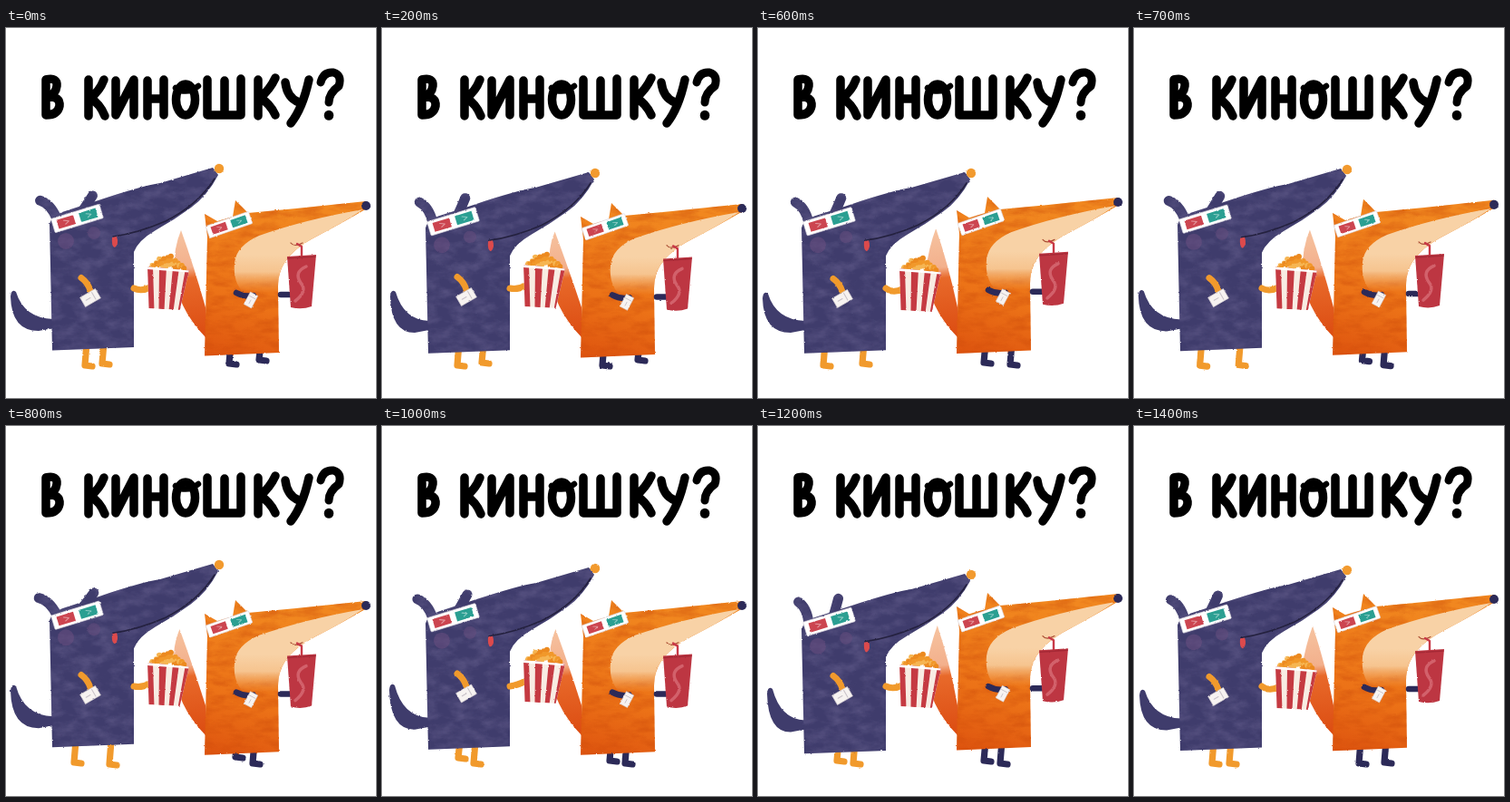
Animation, 408 px wide and 408 px high, one loop 1500 ms. Source, as an HTML page:

```html
<!DOCTYPE html>
<html lang="ru">
<head>
<meta charset="utf-8">
<style>
html, body { margin: 0; width: 100%; height: 100%; overflow: hidden; background: #fff; }
svg { display: block; width: 100vw; height: 100vh; }
path { stroke-linecap: round; stroke-linejoin: round; }
.line { fill: none; }
.orange { stroke: #f19a2c; }
.navy { stroke: #2c2a58; }
</style>
</head>
<body>
<svg viewBox="0 0 408 408">
  <defs>
    <filter id="rough" filterUnits="userSpaceOnUse" x="0" y="0" width="408" height="408" color-interpolation-filters="sRGB">
      <feTurbulence type="fractalNoise" baseFrequency=".35" numOctaves="2" seed="4"/>
      <feDisplacementMap in="SourceGraphic" scale="2" xChannelSelector="R" yChannelSelector="G"/>
    </filter>
    <filter id="dogGrain" filterUnits="userSpaceOnUse" x="0" y="0" width="408" height="408" color-interpolation-filters="sRGB">
      <feTurbulence type="fractalNoise" baseFrequency=".05 .09" numOctaves="4" seed="8"/>
      <feColorMatrix values="0 0 0 0 .45  0 0 0 0 .42  0 0 0 0 .6  .9 0 0 0 -.33"/>
      <feComposite operator="in" in2="SourceGraphic" result="grain"/>
      <feMerge><feMergeNode in="SourceGraphic"/><feMergeNode in="grain"/></feMerge>
    </filter>
    <filter id="foxGrain" filterUnits="userSpaceOnUse" x="0" y="0" width="408" height="408" color-interpolation-filters="sRGB">
      <feTurbulence type="fractalNoise" baseFrequency=".04 .11" numOctaves="4" seed="3"/>
      <feColorMatrix values="0 0 0 0 .78  0 0 0 0 .27  0 0 0 0 .03  1 0 0 0 -.4"/>
      <feComposite operator="in" in2="SourceGraphic" result="grain"/>
      <feMerge><feMergeNode in="SourceGraphic"/><feMergeNode in="grain"/></feMerge>
    </filter>
    <linearGradient id="fur" gradientUnits="userSpaceOnUse" x1="285" y1="200" x2="235" y2="365">
      <stop offset="0" stop-color="#f1871f"/><stop offset=".6" stop-color="#ec7217"/><stop offset="1" stop-color="#de540f"/>
    </linearGradient>
    <linearGradient id="cream" gradientUnits="userSpaceOnUse" x1="0" y1="250" x2="0" y2="292">
      <stop offset="0" stop-color="#f8d2a6"/><stop offset=".45" stop-color="#f6c48f"/><stop offset="1" stop-color="#f3a558" stop-opacity="0"/>
    </linearGradient>
    <linearGradient id="brush" gradientUnits="userSpaceOnUse" x1="192" y1="222" x2="204" y2="340">
      <stop offset="0" stop-color="#f6c3a0"/><stop offset=".36" stop-color="#f3b08c"/><stop offset=".46" stop-color="#e8692a"/><stop offset="1" stop-color="#dc4d12"/>
    </linearGradient>
    <clipPath id="bucketShape"><path d="M0 0 46 2 38 46 4 46Z"/></clipPath>
    <g id="specs">
      <rect x="-26" y="-7.5" width="52" height="15" rx="1" fill="#fff" stroke="#d8d3dc" stroke-width=".6"/>
      <rect x="-21" y="-4.7" width="18" height="9.6" fill="#cc4550"/>
      <rect x="3" y="-4.7" width="18" height="9.6" fill="#2b9f92"/>
      <path d="M-14-2l5 2-4 2M10-2l5 2-4 2" class="line" stroke="#fff" stroke-opacity=".45"/>
    </g>
    <g id="ticket">
      <rect x="-9" y="-5.5" width="18" height="11" fill="#f7f3f1" stroke="#d4cdd2" stroke-width=".6"/>
      <path d="M4-4V4M-5 0H0" stroke="#c9c2c8" stroke-width="1"/>
    </g>
  </defs>

  <g class="line" role="img" aria-label="В киношку?" stroke="#000" stroke-width="9.5">
    <path d="M44 57V96M44 57Q57 54 56 64 55 73 46 76 60 75 59 86 57 96 44 96"/>
    <path d="M91 57V97M108 57Q103 70 93 77 104 84 109 97"/>
    <path d="M121 58V96L141 57V96"/>
    <path d="M156 58V97M174 57V96M157 78H174"/>
    <ellipse cx="198" cy="79" rx="10.5" ry="17"/><path d="M187 66Q199 74 212 64" stroke-width="6.5"/>
    <path d="M222 57V96H259V56M241 58V95"/>
    <path d="M278 57V97M297 55Q291 68 280 77 291 83 297 96"/>
    <path d="M308 60Q310 77 323 82M334 57Q327 89 314 105"/>
    <path d="M347 60Q350 48 361 49 371 52 367 64 356 72 356 82" stroke-width="9"/>
    <path d="M356 96V96.5" stroke-width="10.5"/>
  </g>

  <g filter="url(#rough)">
    <path id="foxTail" fill="url(#brush)"/>
    <path id="dogTail" fill="#3f3c6c"/>
    <g class="line orange" stroke-width="7.2"><path id="dogL"/><path id="dogR"/></g>
    <g class="line navy" stroke-width="7.2"><path id="foxL"/><path id="foxR"/></g>

    <g id="dog">
      <g filter="url(#dogGrain)">
        <g class="line" stroke="#3f3c6c" stroke-width="11">
          <path id="earL" d="M56 210Q50 193 39 189"/>
          <path id="earR" d="M82 205Q87 197 94 184"/>
        </g>
        <path fill="#3f3c6c" d="M51 355.5 48 216Q50 208 62 203L102 190Q150 174 170 171L228 154 234 162Q222 185 204 198 185 212 165 223 146 234 141 247L141 352Z"/>
      </g>
      <circle cx="66" cy="235" r="9" fill="#6d4f81" opacity=".5"/>
      <circle cx="97" cy="226" r="7" fill="#6d4f81" opacity=".45"/>
      <path class="line" stroke="#24213f" stroke-width="1.6" d="M230 166Q212 195 176 213 146 226 118 230"/>
      <path d="M117 231 122 230Q125 238 120 242 116 241 117 231Z" fill="#dc4a4c"/>
      <circle cx="235" cy="155" r="5.2" fill="#f29a2e"/>
    </g>
    <use id="dogSpecs" href="#specs"/>

    <g id="dogHold">
      <path class="line orange" stroke-width="7" d="M83 275Q90 280 93 289"/>
      <use href="#ticket" transform="translate(93 297) rotate(-30) scale(1.08)"/>
    </g>
    <path id="dogArm" class="line orange" stroke-width="7"/>
    <g id="bucket">
      <g id="corn"></g>
      <g clip-path="url(#bucketShape)">
        <rect width="48" height="50" fill="#f8ece3"/>
        <path fill="#c53a42" d="M0 0H6L10 48H3ZM13 0H21L21 48H15ZM28 0H35L31 48H26ZM42 0H48L39 48H36Z"/>
        <path fill="#fff" d="M0 0 46 1V4L0 3Z"/>
      </g>
    </g>

    <g id="fox">
      <g filter="url(#foxGrain)">
        <path fill="url(#fur)" d="M219 361.5 222 230 219 205 233 213 250 208 253 190 267 204 320 199 397 191 398 199Q367 217 342 230 317 243 307 259 300 270 300 285L301 358Z"/>
      </g>
      <path fill="url(#cream)" d="M394 200Q330 211 279 229 254 240 252 259 250 280 262 292L300 292Q299 270 307 259 317 243 342 230 368 217 394 200Z"/>
      <path class="line" stroke="#a94c32" stroke-width="1.2" d="M314 237Q318 242 327 237"/>
      <circle cx="397" cy="196" r="5" fill="#2c2a58"/>
    </g>
    <use id="foxSpecs" href="#specs"/>
    <g id="foxHold">
      <path class="line navy" stroke-width="6.5" d="M254 292Q263 297 273 295"/>
      <use href="#ticket" transform="translate(270 300) rotate(-62) scale(.85)"/>
      <path class="line navy" stroke-width="6.5" d="M303 294H313"/>
      <path class="line" stroke="#c83a47" stroke-width="2.4" d="M321 238 326 241 326 252"/>
      <path fill="#bd3642" d="M310 252 342 250 337 307Q326 311 314 308Z"/>
      <path class="line" stroke="#a52936" stroke-width="1.5" d="M311 254 341 252"/>
      <path class="line" stroke="#d9707a" stroke-width="3.5" stroke-opacity=".75" d="M331 263Q317 269 325 281 333 290 319 301"/>
    </g>
  </g>
</svg>
<script>
const $ = id => document.getElementById(id);
const set = (id, name, value) => $(id).setAttribute(name, value);
const LOOP = 1500, STEP = 100, GAP = 200;

// dog head dy, dog tail tip x y, bucket y, dog feet x y x y, fox head dy, fox feet x y x y
const poses = [
  [0, 8, 291, 263, 87, 373, 106, 371, 0, 246, 371, 279, 367],
  [5, 12, 291, 261, 83, 373, 110, 370, 3, 243, 373, 282, 367],
  [9, 8, 291, 264, 77, 369, 116, 372, -2, 244, 372, 281, 371],
  [5, 8, 293, 265, 72, 373, 115, 371, -4, 249, 370, 278, 372],
  [-2, 8, 287, 261, 75, 372, 114, 374, 2, 253, 366, 272, 373],
  [2, 11, 286, 258, 84, 367, 101, 373, 2, 251, 370, 268, 373],
  [9, 13, 290, 263, 87, 370, 105, 373, -6, 249, 370, 267, 373],
  [4, 9, 292, 265, 86, 373, 105, 373, -5, 248, 373, 276, 372]
];

// smooth curve through neighbouring poses
function poseAt(t) {
  const i = Math.floor(t / GAP), k = t / GAP - i, n = poses.length;
  const [a, b, c, d] = [-1, 0, 1, 2].map(o => poses[(i + o + n) % n]);
  return b.map((p, j) => p + k / 2 * (c[j] - a[j]
    + k * (2 * a[j] - 5 * p + 4 * c[j] - d[j] + k * (3 * (p - c[j]) + d[j] - a[j]))));
}

function leg(id, x, y) {
  set(id, "d", `M${x + 2} 347L${x} ${y - 1}l8 1`);
}

// the whole body bobs, the head a little more than the hem
function bob(id, dy, hem, height) {
  set(id, "transform", `translate(0 ${hem + dy * .65}) scale(1 ${1 - dy * .35 / height}) translate(0 ${-hem})`);
}

function draw(t) {
  const [dog, tx, ty, by, lx, ly, rx, ry, fox, flx, fly, frx, fry] = poseAt(t);
  bob("dog", dog, 354, 200);
  bob("fox", fox, 360, 164);
  set("earL", "transform", `rotate(${dog * 2 - 4} 56 210)`);
  set("earR", "transform", `rotate(${4 - dog * 2} 82 205)`);
  set("dogSpecs", "transform", `translate(78.5 ${210 + dog * .65}) rotate(-17) scale(1.07)`);
  set("foxSpecs", "transform", `translate(246 ${217 + fox * .75}) rotate(-19) scale(.96 .93)`);
  set("dogHold", "transform", `translate(0 ${(by - 262) * .5})`);
  set("foxHold", "transform", `translate(0 ${fox * .8})`);
  set("dogArm", "d", `M141 287Q149 ${by + 28} 159 ${by + 23}`);
  set("bucket", "transform", `translate(156 ${by}) rotate(3)`);

  const root = 321 + dog * .4;
  set("dogTail", "d", `M52 ${root}Q${tx + 12} ${root - 1} ${tx + 3} ${ty}Q${tx - 2} ${ty - 4} ${tx - 3} ${ty + 5}Q${tx - 2} ${root + 13} 36 ${root + 13}L52 ${root + 10}Z`);
  const tipX = 193 - fox * .8, tipY = 223 + fox * .5;
  set("foxTail", "d", `M${tipX} ${tipY}Q${tipX - 8} 242 185 268Q188 308 220 341V308Q${tipX + 14} 262 ${tipX} ${tipY}Z`);

  leg("dogL", lx, ly);
  leg("dogR", rx, ry);
  leg("foxL", flx, fly);
  leg("foxR", frx, fry);
}

function fillBucket() {
  const colours = ["#f1982a", "#f6b552", "#ec8a20"];
  let kernels = "";
  for (let i = 0; i < 30; i++) {
    const x = 4 + i * 1.25, rise = 13 * Math.sin(i / 29 * Math.PI) * (i * 37 % 10 / 9);
    kernels += `<circle cx="${x}" cy="${-rise}" r="${2.3 + i % 2 * .8}" fill="${colours[i % 3]}"/>`;
  }
  $("corn").innerHTML = kernels;
}

let shown = -1;
function tick() {
  const t = Math.floor(performance.now() % LOOP / STEP) * STEP;
  if (t !== shown) draw(shown = t);
  requestAnimationFrame(tick);
}

fillBucket();
tick();
</script>
</body>
</html>
```
